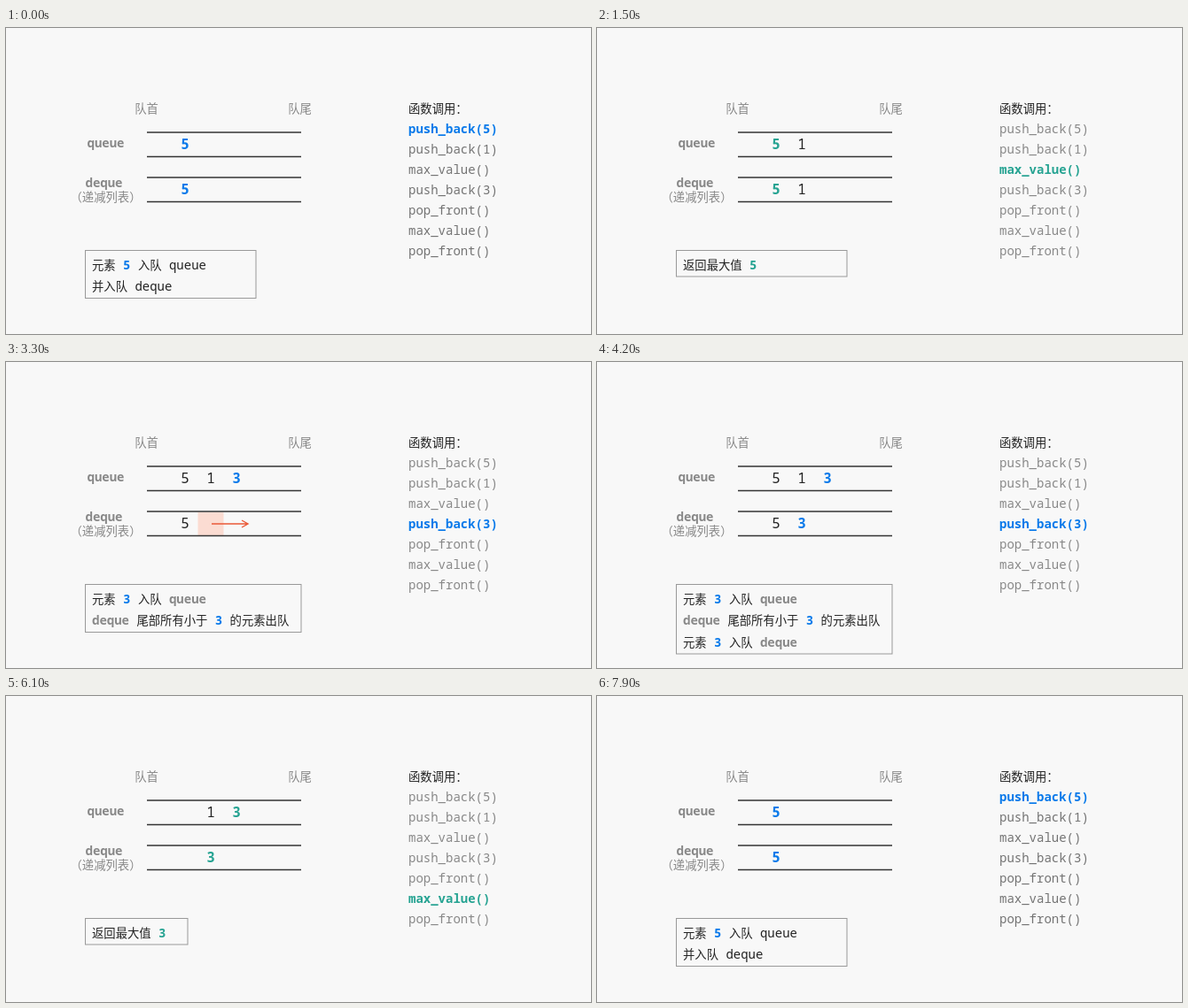
An HTML page that plays this animation: 660 px wide and 346 px high, repeating every 8000 ms.

```html
<!DOCTYPE html>
<html lang="zh-CN">
<head>
<meta charset="utf-8">
<title>Max queue</title>
<style>
html, body { margin: 0; width: 100%; height: 100%; overflow: hidden; background: #f8f8f8; }
svg { display: block; }
text { white-space: pre; font: 14px "Noto Sans Mono", "Noto Sans CJK SC", monospace; fill: #222; }
.cjk { font: 13.333px "Noto Sans CJK SC", "Noto Sans CJK", sans-serif; }
.mid { text-anchor: middle; }
.grey { fill: #888; }
.bold { font-weight: bold; }
.digit { font-size: 16px; }
</style>
</head>
<body>
<svg id="stage" width="660" height="346" viewBox="0 0 660 346"></svg>
<script>
const BLUE = '#0a7aea', TEAL = '#26a392', ORANGE = '#ea5a38';
const CALLS = ['push_back(5)', 'push_back(1)', 'max_value()', 'push_back(3)',
  'pop_front()', 'max_value()', 'pop_front()'];

// Slots: * accent, . empty, < leaves at the front, > leaves at the back.
// Notes: *accent*, _grey name_.
const first = {
  at: 0, call: 0, color: BLUE, dim: '#737373', queue: '5*', deque: '5*', right: 282,
  notes: ['元素 *5* 入队 queue', '并入队 deque']
};
const STEPS = [
  first,
  { at: 500, call: 1, color: BLUE, dim: '#737373', queue: '5 1*', deque: '5 1*', right: 282,
    notes: ['元素 *1* 入队 queue', '并入队 deque'] },
  { at: 1500, call: 2, color: TEAL, queue: '5* 1', deque: '5* 1', right: 282,
    notes: ['返回最大值 *5*'] },
  { at: 2400, call: 3, color: BLUE, queue: '5 1 3*', deque: '5 1', right: 282,
    notes: ['元素 *3* 入队 queue'] },
  { at: 3300, call: 3, color: BLUE, queue: '5 1 3*', deque: '5 >', right: 333,
    notes: ['元素 *3* 入队 _queue_', '_deque_ 尾部所有小于 *3* 的元素出队'] },
  { at: 4200, call: 3, color: BLUE, queue: '5 1 3*', deque: '5 3*', right: 333,
    notes: ['元素 *3* 入队 _queue_', '_deque_ 尾部所有小于 *3* 的元素出队', '元素 *3* 入队 _deque_'] },
  { at: 5100, call: 4, color: ORANGE, queue: '< 1 3', deque: '< 3', right: 397,
    notes: ['元素 *5* 出队 _queue_', '元素 *5* 出队 _deque_ ，以保持两队列元素一致'] },
  { at: 6100, call: 5, color: TEAL, queue: '. 1 3*', deque: '. 3*', right: 205,
    notes: ['返回最大值 *3*'] },
  { at: 7000, call: 6, color: ORANGE, queue: '. < 3', deque: '. 3', right: 333,
    notes: ['元素 *1* 出队 _queue_', '_deque_ 首元素不为 *1* ，无需出队'] },
  { ...first, at: 7900 }
];

const text = (x, y, str, cls = '', fill = '') =>
  `<text x="${x}" y="${y}" class="${cls}"${fill && ` style="fill:${fill}"`}>${str}</text>`;

const rail = y => `<path d="M159 ${y}H333" stroke="#333" stroke-width="1.3"/>`;

function note(str, y, color) {
  const spans = str.match(/\*.+?\*|_.+?_|[^\x00-\x7f]+|[^*_\u0080-\uffff]+/g).map(part => {
    const mark = part[0];
    if (mark === '*') return `<tspan class="bold" style="fill:${color}">${part.slice(1, -1)}</tspan>`;
    if (mark === '_') return `<tspan class="bold grey">${part.slice(1, -1)}</tspan>`;
    return mark > '\x7f' ? `<tspan class="cjk">${part}</tspan>` : part;
  });
  return text(97, y, spans.join(''));
}

function leaving(x, y, dir) {
  const tip = x + dir * 42, back = tip - dir * 7;
  return `<rect x="${x - 14.5}" y="${y - 13}" width="29" height="27" fill="#fbdcd2"/>` +
    `<path d="M${x + 1} ${y}H${tip}M${back} ${y - 4}L${tip} ${y}L${back} ${y + 4}"
      fill="none" stroke="${ORANGE}" stroke-width="1.4"/>`;
}

const row = (slots, y, color) => slots.split(' ').map((slot, i) => {
  const x = 202 + i * 29;
  if (slot === '.') return '';
  if (slot === '<' || slot === '>') return leaving(x, y + .5, slot === '<' ? -1 : 1);
  return slot[1] ? text(x, y + 5.5, slot[0], 'digit mid bold', color)
    : text(x, y + 5.5, slot, 'digit mid');
}).join('');

function scene({ call, color, dim = '#888', queue, deque, right, notes }) {
  return row(queue, 131, color) + row(deque, 182.5, color) +
    [118, 145.5, 169, 196.5].map(rail).join('') +
    text(158.5, 96, '队首', 'cjk grey mid') +
    text(331.5, 96, '队尾', 'cjk grey mid') +
    text(112.5, 134.5, 'queue', 'grey bold mid') +
    text(110.5, 179.5, 'deque', 'grey bold mid') +
    text(112.5, 196, '（递减列表）', 'cjk grey mid') +
    text(454, 96, '函数调用：', 'cjk') +
    CALLS.map((name, i) => text(454, 118.5 + i * 23.1, name,
      i === call ? 'bold' : '', i === call ? color : dim)).join('') +
    `<rect x="89.5" y="251.5" width="${right - 89.5}" height="${5 + notes.length * 24.5}"
      fill="none" stroke="#999"/>` +
    notes.map((str, i) => note(str, 273 + i * 24.4, color)).join('');
}

const stage = document.getElementById('stage');
let shown;
function tick() {
  const time = performance.now() % 8000;
  const step = STEPS.findLast(s => s.at <= time);
  if (step !== shown) {
    stage.innerHTML = scene(step);
    shown = step;
  }
  requestAnimationFrame(tick);
}
tick();
</script>
</body>
</html>
```
